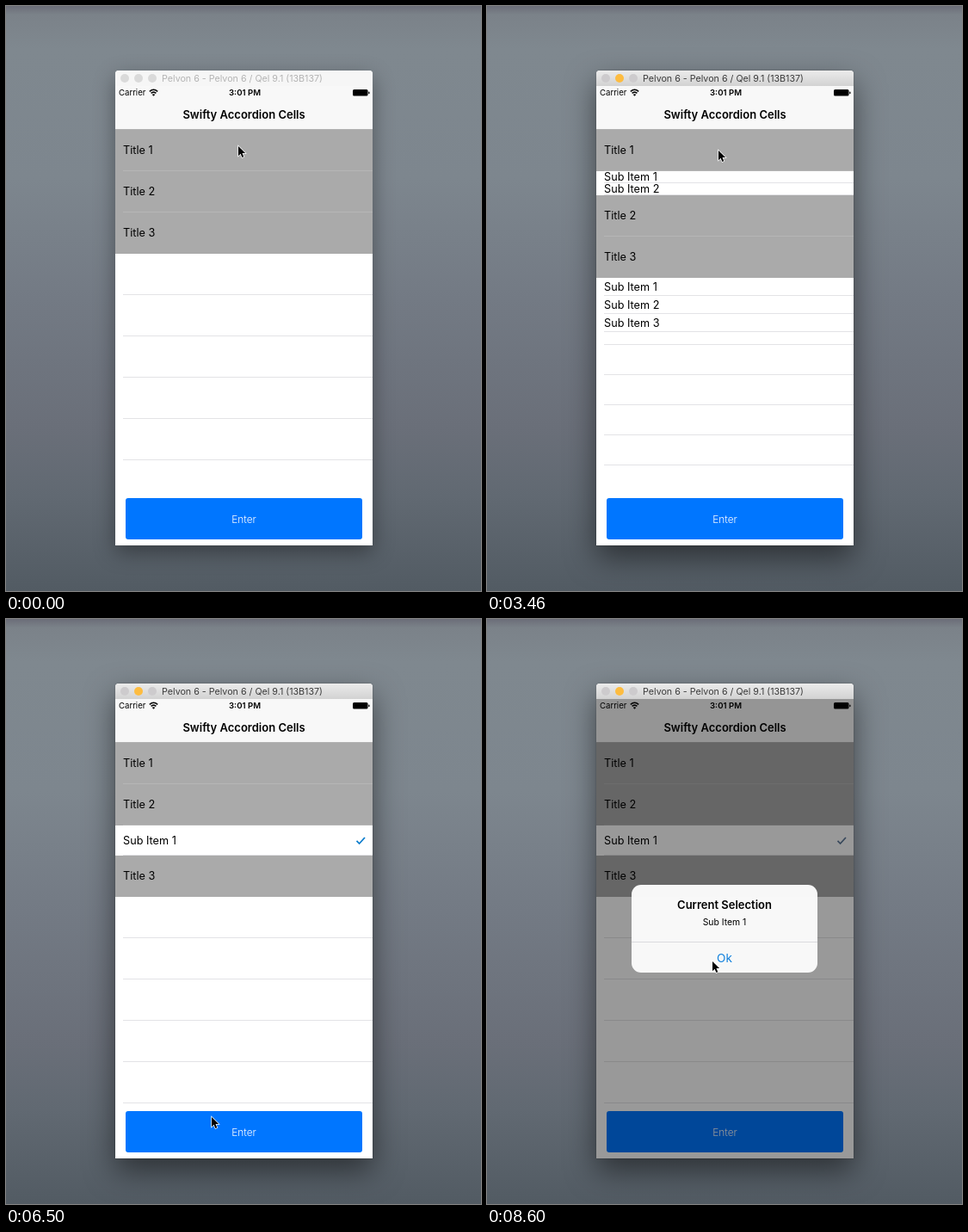
Recreate the animation shown at these times as an HTML page. Size 552x680 px, loop 8.62 s.

```html
<!DOCTYPE html>
<html lang="en">
<head>
<meta charset="utf-8">
<title>Accordion cells</title>
<style>
html, body { margin: 0; width: 100%; height: 100%; overflow: hidden; }
body {
  position: relative; font-family: Inter, Roboto, sans-serif; color: #000;
  background: linear-gradient(#6b6d78 0, #7b8289 10px, #7f888f 50px, #7d868e 200px,
    #737a84 340px, #6a6f79 490px, #616972 570px, #525b63 680px);
}
body * { position: absolute; box-sizing: border-box; }
.window {
  left: 127px; top: 75px; width: 299px; height: 552px; border-radius: 4px 4px 0 0;
  background: #fff; box-shadow: 0 8px 24px rgba(0,0,0,.38);
}
.window.active { box-shadow: 0 14px 34px rgba(0,0,0,.5), 0 0 2px rgba(0,0,0,.3); }
.bar {
  left: 0; top: 0; width: 100%; height: 18px; border-radius: 4px 4px 0 0;
  background: #f6f6f6; color: #b4b4b4;
}
.active .bar { background: linear-gradient(#ebebeb, #d2d2d2); color: #3c3c3c; }
.light { top: 4px; width: 10px; height: 10px; border-radius: 50%; background: #dadada; }
.active .light { background: #cdcbcd; }
.active .light.amber { background: #fdbc40; }
.text { white-space: pre; transform: translateY(-50%); line-height: 1.2; }
.center { transform: translate(-50%, -50%); }
.bold { font-weight: 600; }
.nav { left: 0; top: 18px; width: 100%; height: 51px; background: #f8f8f8; border-bottom: 1px solid #b2b2b2; }
.table { left: 0; top: 69px; width: 100%; height: 421px; overflow: hidden; background: #fff; }
.rows { left: 0; top: 0; width: 100%; }
.row { position: relative; overflow: hidden; background: #fff; }
.row.title { background: #aaa; }
.row .text { left: 9px; top: 50%; font-size: 12.7px; }
.row::after, .line {
  content: ""; position: absolute; left: 9px; right: 0; height: 1px; background: #e3e3e6;
}
.row::after { bottom: 0; }
.row.title::after { background: #b6b6b6; }
.row.last::after { background: none; }
.button {
  left: 12px; top: 497px; width: 275px; height: 48px; border-radius: 3px; background: #0076ff;
}
.dim { left: 0; top: 18px; width: 100%; height: 534px; background: #000; }
.alert {
  left: 168px; top: 309px; width: 216px; height: 102px; border-radius: 11px;
  background: rgba(250,250,250,.985);
}
.rule { left: 0; top: 66px; width: 100%; height: 1px; background: #dadade; }
svg { overflow: visible; }
#cursor { left: 0; top: 0; }
</style>
</head>
<body>
<div class="window" id="window">
  <div class="bar">
    <i class="light" style="left:6px"></i>
    <i class="light amber" style="left:22px"></i>
    <i class="light" style="left:38px"></i>
    <span class="text" style="left:54px;top:9.5px;font-size:10.7px">Pelvon 6 - Pelvon 6 / Qel 9.1 (13B137)</span>
  </div>
  <div class="nav">
    <span class="text" style="left:4px;top:8px;font-size:9.6px">Carrier</span>
    <svg style="left:39px;top:3px" width="11" height="9" fill="none" stroke="#000" stroke-width="1.5">
      <path d="M.8 3.4Q5.5-.8 10.2 3.4M2.6 5.4Q5.5 2.8 8.4 5.4"/>
      <path d="M5.5 8.8 3.8 6.9Q5.5 5.6 7.2 6.9Z" fill="#000" stroke="none"/>
    </svg>
    <span class="text center bold" style="left:150.5px;top:8px;font-size:9.6px">3:01 PM</span>
    <svg style="left:276px;top:4px" width="20" height="8">
      <rect width="17.5" height="7.5" rx="1.5"/><rect x="18.2" y="2.4" width="1.3" height="2.8" rx=".6"/>
    </svg>
    <span class="text center bold" style="left:149.5px;top:33.5px;font-size:13px">Swifty Accordion Cells</span>
  </div>
  <div class="table" id="table"><div class="rows" id="rows"></div></div>
  <div class="button"><span class="text center" style="left:50%;top:24.5px;font-size:11.8px;font-weight:300;color:#fff">Enter</span></div>
  <div class="dim" id="dim"></div>
</div>
<div class="alert" id="alert">
  <span class="text center bold" style="left:50%;top:24px;font-size:13px">Current Selection</span>
  <span class="text center" style="left:50%;top:44px;font-size:10.4px">Sub Item 1</span>
  <div class="rule"></div>
  <span class="text center" style="left:50%;top:85px;font-size:13.6px;color:#0f7fdc">Ok</span>
</div>
<svg id="cursor" width="10" height="15">
  <path d="M0 0V11.2L2.6 8.8 4.4 13 6.3 12.2 4.5 8.1H8.1Z" stroke="#fff" stroke-width="1.4" paint-order="stroke"/>
</svg>
<script>
const LOOP = 8620;
const TITLE_HEIGHT = 48, SUB_HEIGHT = 35.2, SLIDE = 300;
const SUB_COUNTS = [2, 1, 3];
const ACTIVATE = 420, CHECK = 5340, ALERT = 6700;

// Each step: time, open section, spacing of the empty rows.
const STEPS = [
  [-1000, -1, TITLE_HEIGHT], [440, 0, TITLE_HEIGHT], [1720, 1, TITLE_HEIGHT],
  [2380, 2, SUB_HEIGHT], [3330, 0, SUB_HEIGHT], [4070, 2, SUB_HEIGHT],
  [4730, 1, TITLE_HEIGHT]
];

// Pointer: time, x, y.
const PATH = [
  [0, 270, 163], [850, 270, 163], [1280, 270, 272], [1980, 270, 272],
  [2220, 268, 290], [2480, 268, 290], [2700, 267, 265], [3120, 269, 168],
  [3640, 269, 168], [4030, 266, 328], [4340, 266, 328], [4680, 264, 214],
  [4980, 264, 214], [5220, 262, 256], [5480, 262, 256], [5940, 248, 484],
  [6320, 239, 579], [6900, 239, 579], [7480, 249, 471], [8100, 262, 398],
  [LOOP, 262, 398]
];

const $ = id => document.getElementById(id);
const clamp = v => Math.min(1, Math.max(0, v));
const ease = v => (1 - Math.cos(Math.PI * clamp(v))) / 2;
const mix = (a, b, p) => a + (b - a) * p;

function add(parent, className) {
  const el = document.createElement("div");
  el.className = className;
  parent.append(el);
  return el;
}

function addRow(className, label) {
  const row = add($("rows"), "row " + className);
  add(row, "text").textContent = label;
  return row;
}

const lines = Array.from({ length: 9 }, () => add($("table"), "line"));
$("table").append($("rows"));

const sections = SUB_COUNTS.map((count, i) => {
  const title = addRow(i === 2 ? "title last" : "title", `Title ${i + 1}`);
  title.style.height = TITLE_HEIGHT + "px";
  return Array.from({ length: count }, (_, k) => addRow("sub", `Sub Item ${k + 1}`));
});

const checkHost = sections[1][0];
checkHost.insertAdjacentHTML("beforeend",
  '<svg style="left:280px;top:13px" width="11" height="9" fill="none" stroke-width="1.7"><path d="M.5 4.8 3.6 8 10 1"/></svg>');
const check = checkHost.querySelector("svg");

function drawTable(t) {
  const now = STEPS.findLastIndex(step => step[0] <= t);
  const [start, open, pitch] = STEPS[now];
  const before = now ? STEPS[now - 1][1] : -1;
  const p = ease((t - start) / SLIDE);
  sections.forEach((subs, i) => {
    const amount = i === open ? p : i === before ? 1 - p : 0;
    for (const sub of subs) {
      sub.style.height = SUB_HEIGHT * amount + "px";
      sub.style.display = amount ? "" : "none";
    }
  });
  const end = 3 * TITLE_HEIGHT + (SUB_COUNTS[open] || 0) * SUB_HEIGHT;
  lines.forEach((line, k) => {
    line.style.top = Math.round(end + (k + 1) * pitch) - 1 + "px";
  });
}

function drawCursor(t) {
  const next = Math.max(1, PATH.findIndex(point => point[0] > t));
  const [t0, x0, y0] = PATH[next - 1], [t1, x1, y1] = PATH[next];
  const p = (t - t0) / (t1 - t0);
  // Fast stretches blend a linear move with a soft start and stop.
  const q = mix(p, ease(p), .5);
  $("cursor").style.transform =
    `translate(${Math.round(mix(x0, x1, q))}px, ${Math.round(mix(y0, y1, q))}px)`;
}

function draw(t) {
  $("window").classList.toggle("active", t >= ACTIVATE);
  drawTable(t);
  drawCursor(t);
  const shown = ease((t - ALERT) / 350);
  check.style.display = t >= CHECK ? "" : "none";
  check.style.stroke = shown > .5 ? "#5d7898" : "#0a7ccc";
  $("dim").style.opacity = .4 * shown;
  $("alert").style.opacity = shown;
  $("alert").style.transform = `scale(${mix(1.2, 1, shown)})`;
}

const begin = performance.now();
function frame() {
  draw((performance.now() - begin) % LOOP);
  requestAnimationFrame(frame);
}
frame();
</script>
</body>
</html>
```
